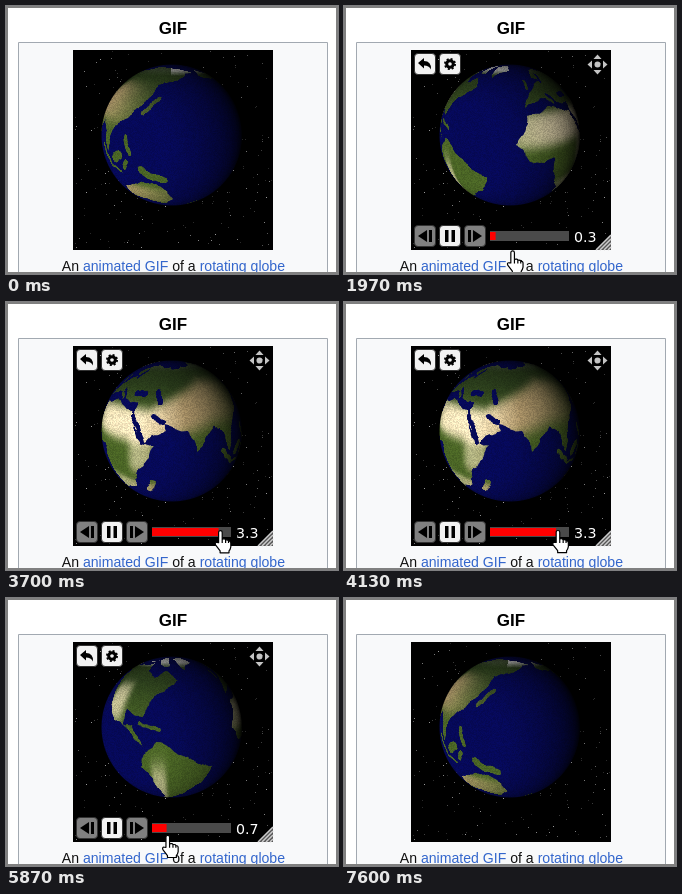
An HTML page with a canvas that plays this animation: 332 px wide and 268 px high, repeating every 7630 ms.

```html
<!DOCTYPE html>
<html lang="en">
<head>
<meta charset="utf-8">
<title>Rotating globe</title>
<style>
  html, body { margin: 0; width: 100%; height: 100%; overflow: hidden; background: #fff; }
  svg, canvas { position: absolute; left: 0; top: 0; }
  #sky { left: 67px; top: 44px; background: #000; }
  #globe { left: 94px; top: 57px; }
  .label { font-family: "Liberation Sans", Arial, sans-serif; text-anchor: middle; }
  .link { fill: #36c; }
  .clock { font: 14.2px "DejaVu Sans", Verdana, sans-serif; fill: #fff; }
</style>
</head>
<body>
<svg width="332" height="268">
  <path d="M12.5 270V36.5H321.5V270" fill="#f8f9fa" stroke="#a2a9b1"/>
  <text class="label" x="167" y="28" font-size="17" font-weight="700">GIF</text>
  <text class="label" x="167.4" y="265" font-size="14.1" fill="#111">An <tspan class="link">animated GIF</tspan> of a <tspan class="link">rotating globe</tspan></text>
</svg>
<canvas id="sky" width="200" height="200"></canvas>
<canvas id="globe" width="144" height="144"></canvas>
<svg width="332" height="268">
  <defs>
    <rect id="key" x=".5" y=".5" width="21" height="21" rx="3.5" stroke="#333"/>
    <g id="step">
      <use href="#key" fill="#808080"/>
      <path d="M4 11L13 5V17Z"/><path d="M15 5h3v12h-3z"/>
    </g>
  </defs>
  <g id="controls" opacity="0">
    <g transform="translate(70 47)">
      <use href="#key" fill="#f2f2f2"/>
      <path d="M4 10L10 5V8Q17.5 8 17 16.5Q15 12.500 10 12.500V15.500Z"/>
    </g>
    <g transform="translate(95 47)">
      <use href="#key" fill="#f2f2f2"/>
      <circle cx="11" cy="11" r="3.300" fill="none" stroke="#000" stroke-width="3"/>
      <circle cx="11" cy="11" r="5" fill="none" stroke="#000" stroke-width="2" stroke-dasharray="1.963"/>
    </g>
    <use href="#step" transform="translate(70 219)"/>
    <g transform="translate(95 219)">
      <use href="#key" fill="#f2f2f2"/>
      <path d="M6 5h3.500v12H6zM12.500 5H16v12h-3.500z"/>
    </g>
    <use href="#step" transform="translate(142 219) scale(-1 1)"/>
    <path d="M146 225h79v10h-79z" fill="#4a4a4a"/>
    <rect id="fill" x="146" y="226" height="8" fill="#f00"/>
    <text class="clock" id="clock" x="230" y="236"></text>
    <g transform="translate(253.500 58.500)" fill="#c4c4c4">
      <circle r="3"/>
      <path id="tip" d="M0-10L4-5.500H-4Z"/>
      <use href="#tip" transform="rotate(90)"/>
      <use href="#tip" transform="rotate(180)"/>
      <use href="#tip" transform="rotate(270)"/>
    </g>
    <path d="M267 229V244H252Z" fill="#555"/>
    <path d="M252 244L267 229M256 244L267 233M260 244L267 237M264 244L267 241" stroke="#ccc" stroke-width="1.500"/>
  </g>
  <path id="hand" fill="#fff" stroke="#000" stroke-width="1.200" stroke-linejoin="round"
    d="M4 12.500V2.300a1.800 1.800 0 0 1 3.600 0V9q3-.8 3.400 .8q2.500-.5 2.900 .9q2.300 0 2.300 2v4q-.5 2.800-1.800 4v2H5.500v-2L.9 14.800q-.9-2.600 1.300-2.400zM7.600 9v4M11 10v3M13.900 11v2"/>
  <path d="M1 1H331V267H1Z" fill="none" stroke="#808080" stroke-width="2"/>
</svg>
<script>
const LOOP = 7630, CLIP = 3.96, BAR = 146, BAR_SPAN = 80;
const $ = id => document.getElementById(id);
const clamp = (v, lo = 0, hi = 1) => Math.min(hi, Math.max(lo, v));
const mix = (a, b, k) => a.map((v, i) => v + (b[i] - v) * k);
const bell = (v, mid, width) => Math.exp(-(((v - mid) / width) ** 4));

function randomizer(seed) {
  return () => (seed = (seed * 16807) % 2147483647) / 2147483647;
}

// Rough outlines in longitude and latitude; roughen() adds the coast detail
const continents = {
  africa: [[-17, 15], [-9, 32], [10, 37], [32, 31], [43, 12], [51, 12], [40, -5], [35, -22], [20, -34], [12, -15], [9, 4], [-8, 4]],
  europe: [[-9, 37], [-3, 47], [9, 55], [22, 57], [8, 60], [25, 71], [60, 69], [60, 40], [35, 37], [23, 38], [13, 44], [0, 40]],
  asia: [[50, 68], [108, 76], [188, 67], [162, 59], [138, 54], [128, 37], [121, 30], [108, 20], [103, 3], [98, 16], [90, 22], [77, 8], [71, 21], [57, 25], [58, 21], [45, 13], [34, 29], [35, 40]],
  northAmerica: [[-166, 62], [-156, 71], [-95, 69], [-93, 59], [-79, 53], [-68, 60], [-56, 51], [-74, 40], [-81, 26], [-95, 29], [-96, 19], [-88, 20], [-79, 8], [-105, 20], [-124, 42], [-135, 58]],
  southAmerica: [[-78, 4], [-71, 12], [-50, 1], [-35, -7], [-40, -21], [-57, -37], [-69, -54], [-71, -25], [-81, -6]],
  australia: [[114, -23], [131, -12], [142, -12], [153, -27], [147, -38], [131, -32], [116, -35]],
  greenland: [[-45, 60], [-58, 76], [-30, 83], [-22, 70]],
  arctic: [[-122, 71], [-75, 82], [-64, 65]]
};

// Narrow lands and seas as strokes: start, end, width in degrees
const ridges = {
  italy: [[10, 44], [17, 39], 2.5], britain: [[-4, 51], [-4, 57], 3], japan: [[131, 33], [142, 43], 3],
  sumatra: [[96, 5], [105, -5], 3], java: [[106, -7], [116, -8], 2], borneo: [[111, 0], [116, 4], 6],
  sulawesi: [[120, -4], [122, 1], 3], philippines: [[121, 17], [125, 7], 3], newGuinea: [[133, -2], [147, -8], 5],
  madagascar: [[45, -23], [49, -14], 4], newZealand: [[169, -45], [177, -39], 3], cuba: [[-83, 22], [-69, 19], 2]
};
const seas = {
  red: [[34, 28], [43, 13], 3], persian: [[49, 29], [56, 26], 3], adriatic: [[13, 45], [19, 39], 2],
  black: [[30, 43], [39, 43], 4], caspian: [[50, 45], [53, 38], 4], baltic: [[17, 56], [22, 64], 3]
};

// Midpoint displacement
function roughen(points, random, closed, level = 3) {
  if (!level) return points;
  const finer = points.flatMap((p, i) => {
    if (!closed && i === points.length - 1) return [p];
    const q = points[(i + 1) % points.length];
    const dx = q[0] - p[0], dy = q[1] - p[1], bend = (random() - .5) * .24;
    return [p, [(p[0] + q[0]) / 2 - dy * bend, (p[1] + q[1]) / 2 + dx * bend]];
  });
  return roughen(finer, random, closed, level - 1);
}

function drawLand(w, h) {
  const canvas = document.createElement("canvas");
  canvas.width = w;
  canvas.height = h;
  const c = canvas.getContext("2d", { willReadFrequently: true });
  const random = randomizer(31), unit = w / 360;
  c.lineCap = "round";
  const trace = (points, width) => {
    const line = roughen(points, random, !width);
    for (const turn of [-360, 0, 360]) {
      c.setTransform(unit, 0, 0, -unit, w / 2 + turn * unit, h / 2);
      c.beginPath();
      line.forEach(p => c.lineTo(...p));
      c.lineWidth = width;
      width ? c.stroke() : c.fill();
    }
  };
  const strokes = set => Object.values(set).forEach(([a, b, width]) => trace([a, b], width));
  Object.values(continents).forEach(points => trace(points, 0));
  strokes(ridges);
  c.globalCompositeOperation = "destination-out";
  strokes(seas);
  return c.getImageData(0, 0, w, h).data;
}

// Climate: desert belts, dark northern forest, western arctic ice
function groundColor(lon, lat) {
  const east = clamp((lon - 45) / 45);
  const dry = clamp(
    bell(lat, 23 + 16 * east, 11 + 5 * east) * bell(lon, 45, 72)
    + .8 * bell(lat, -25, 10) * bell(lon, 80, 72)
    + .7 * bell(lat, 33, 14) * bell(lon, -109, 11)
    + .6 * bell(lat, -28, 26) * bell(lon, -70, 5)
    + .6 * bell(lat, 3, 12) * bell(lon, 42, 9));
  const forest = mix([72, 98, 36], [46, 66, 30], clamp((lat - 15) / 35));
  const sand = mix([244, 228, 188], [184, 158, 112], clamp((lon - 40) / 30 + clamp(-lat / 10) * .6 + clamp(-lon / 60)));
  const ice = clamp((lat - 63) / 8) * (lon < -15 || lon > 150 ? 1 : .15);
  return mix(mix(forest, sand, dry), [215, 215, 212], ice);
}

function makeMap(w, h) {
  const map = drawLand(w, h), random = randomizer(77);
  for (let i = 0; i < map.length; i += 4) {
    const n = i / 4, lon = (n % w / w - .5) * 360, lat = (.5 - Math.floor(n / w) / h) * 180;
    const grain = .88 + random() * .2;
    const color = mix([6, 9, 86], groundColor(lon, lat), map[i + 3] / 255);
    for (let k = 0; k < 3; k++) map[i + k] = color[k] * grain;
  }
  return map;
}

const MAP_W = 720, MAP_H = 360, SIZE = 144, RADIUS = 70.5;
const map = makeMap(MAP_W, MAP_H);
const globe = $("globe").getContext("2d");
const image = globe.createImageData(SIZE, SIZE);

// Perspective view from 3 radii away: each pixel keeps its map row, longitude offset and light
const dots = [];
(function projectSphere() {
  const far = 3, lens = far * far - 1, tilt = 21 * Math.PI / 180;
  const sin = Math.sin(tilt), cos = Math.cos(tilt);
  for (let j = 0; j < SIZE; j++) for (let i = 0; i < SIZE; i++) {
    const px = (i + .5 - SIZE / 2) / RADIUS, py = (SIZE / 2 - j - .5) / RADIUS;
    const r = Math.hypot(px, py), cover = clamp((1 - r) * RADIUS + .5);
    if (!cover) continue;
    const q = 1 + Math.min(1, r * r) / lens;
    const reach = (far - Math.sqrt(Math.max(0, far * far - q * lens))) / q;
    const x = px * reach / Math.sqrt(lens), y = py * reach / Math.sqrt(lens), z = far - reach;
    const lat = Math.asin(clamp(y * cos + z * sin, -1, 1));
    const lon = Math.atan2(x, z * cos - y * sin);
    const light = clamp(.12 + 1.05 * (-.5 * x - .15 * y + .85 * z), 0, 1.05);
    const row = Math.min(MAP_H - 1, Math.floor((.5 - lat / Math.PI) * MAP_H));
    dots.push({ at: (j * SIZE + i) * 4, row: row * MAP_W, col: lon / Math.PI * MAP_W / 2, light, cover });
  }
})();

function drawGlobe(clipTime) {
  const center = MAP_W * (2.5 + 5 / 360 - clipTime / CLIP);
  for (const d of dots) {
    const from = (d.row + Math.floor(center + d.col) % MAP_W) * 4;
    for (let k = 0; k < 3; k++) image.data[d.at + k] = map[from + k] * d.light;
    image.data[d.at + 3] = 255 * d.cover;
  }
  globe.putImageData(image, 0, 0);
}

function drawStars() {
  const sky = $("sky").getContext("2d"), random = randomizer(4021);
  for (let i = 0; i < 260; i++) {
    const v = 40 + 120 * random() ** 3;
    sky.fillStyle = `rgb(${v},${v},${v})`;
    sky.fillRect(Math.floor(random() * 200), Math.floor(random() * 200), 1, 1);
  }
}

// Pointer path: time, x, y
const GRAB = 2600, RELEASE = 6500;
const path = [
  [1300, 176, 268], [1900, 168, 246], [GRAB, 164.4, 230], [2970, 150, 229], [3800, 222, 228],
  [4130, 213, 228], [5070, 168, 234], [5500, 154, 236], [6400, 170.4, 238], [RELEASE, 170.4, 238]
];

function pointerAt(t) {
  const next = path.findIndex(p => p[0] > t);
  const n = next < 0 ? path.length - 1 : Math.max(1, next);
  const [a, b] = [path[n - 1], path[n]];
  return mix(a, b, clamp((t - a[0]) / (b[0] - a[0]))).slice(1);
}

function clipTimeAt(t, x) {
  if (t < GRAB) return (2.34 + Math.max(0, t - 70) / 1000) % CLIP;
  if (t < RELEASE) return (x - BAR) / BAR_SPAN * CLIP;
  return 1.21 + (t - RELEASE) / 1000;
}

function render(t) {
  const [x, y] = pointerAt(t);
  const clipTime = clipTimeAt(t, x);
  drawGlobe(clipTime);
  $("controls").setAttribute("opacity", Math.min(clamp((t - 1450) / 400), clamp((6650 - t) / 200)));
  $("fill").setAttribute("width", clipTime / CLIP * (BAR_SPAN - 1));
  $("clock").textContent = clipTime.toFixed(1);
  $("hand").setAttribute("transform", `translate(${x - 4.8} ${y})`);
  $("hand").setAttribute("visibility", t > 1300 && t < 6470 ? "visible" : "hidden");
}

drawStars();
const start = performance.now();
function tick() {
  render((performance.now() - start) % LOOP);
  requestAnimationFrame(tick);
}
tick();
</script>
</body>
</html>
```
